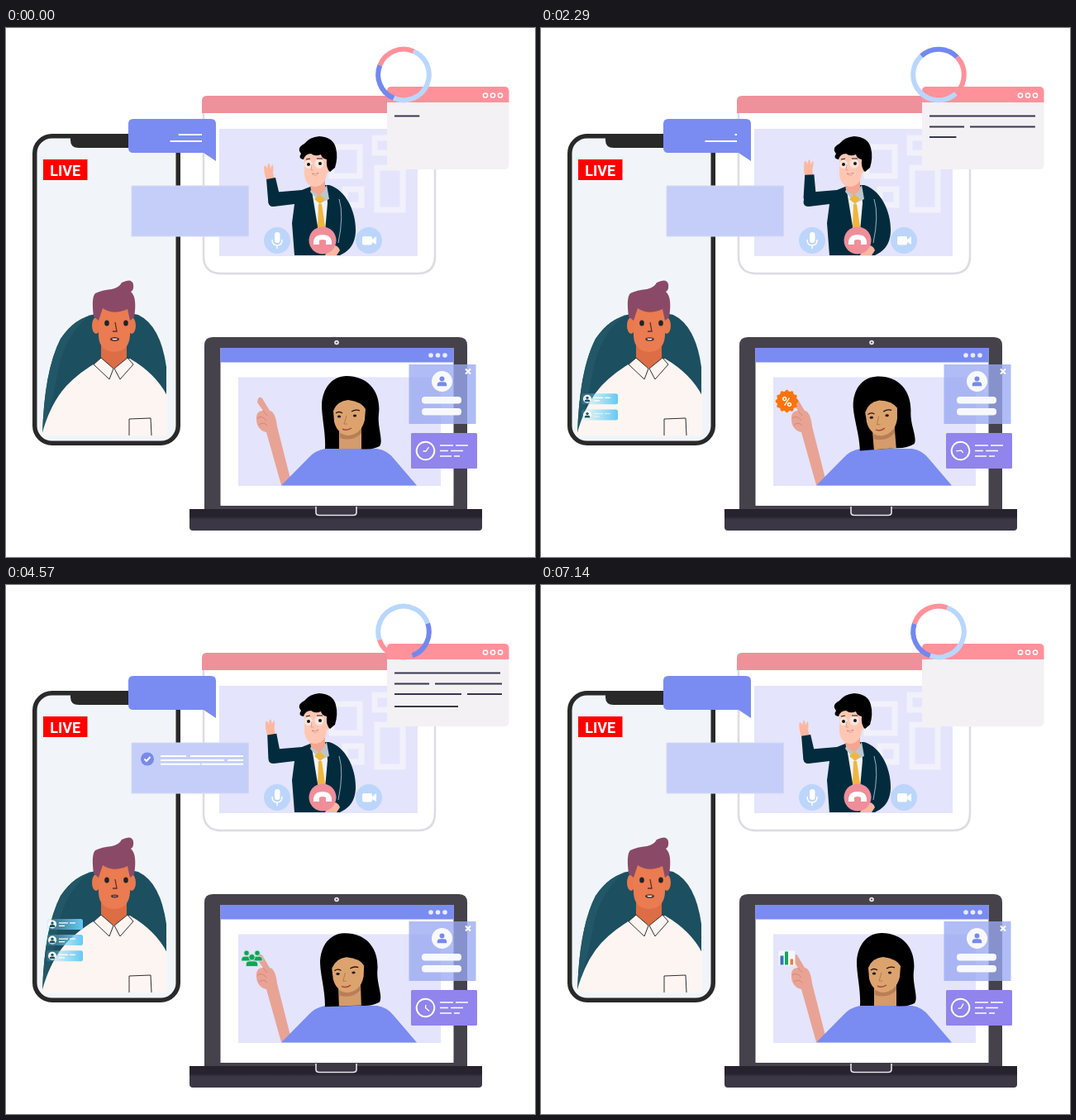
Recreate the animation shown at these times as an HTML page. Size 640x640 px, loop 7210 ms.

```html
<!DOCTYPE html>
<html lang="en">
<head>
<meta charset="utf-8">
<title>Video meetings</title>
<style>
  html, body { margin: 0; width: 100%; height: 100%; overflow: hidden; background: #fff; }
  svg { display: block; width: 100%; height: 100%; }
  text { font-family: Roboto, "Noto Sans", sans-serif; font-weight: 700; text-anchor: middle; }
  .line { fill: none; stroke: #fff; stroke-width: 2; }
</style>
</head>
<body>
<svg viewBox="0 0 640 640">
  <defs>
    <linearGradient id="pillFill">
      <stop offset="0" stop-color="#8fd8f4" stop-opacity=".12"/>
      <stop offset="1" stop-color="#62c9f5"/>
    </linearGradient>
    <linearGradient id="baseFill" x2="0" y2="1">
      <stop offset=".35" stop-color="#27232e"/>
      <stop offset=".5" stop-color="#3b3745"/>
    </linearGradient>
    <clipPath id="phoneView"><path d="M43 300H195V493H43Z"/></clipPath>
    <g id="person">
      <circle cy="-2.2" r="2.6"/><path d="M-5 5.5V4Q-5 1 -2 1H2Q5 1 5 4V5.5Z"/>
    </g>
  </defs>

  <!-- tablet -->
  <path d="M239 95V276Q239 297 261 297H498Q519 297 519 276V95Z" fill="#fff" stroke="#dcdce4" stroke-width="2.5"/>
  <path d="M237 103V88Q237 82 243 82H514Q520 82 520 88V103Z" fill="#ef919b"/>
  <path d="M258 122H498V276H258Z" fill="#e4e4fd"/>
  <path d="M394 144H428V179H394ZM446 133H472V151H446ZM449 169H480V220H449ZM410 195H430V214H410Z" fill="none" stroke="#f1f1fb" stroke-width="7"/>
  <g>
    <path d="M358 196L373 190H391C411 196 424 222 423 247C422 262 415 270 404 275H349L346 236L349 213L324 216Q316 216 318 208L322 199Z" fill="#022c3e"/>
    <g id="forearm">
      <path d="M315 184Q312 176 312 168Q314 164 316 170L317 164Q319 163 320 170L322 165Q324 166 323 175L325 184Z" fill="#fcb7a0"/>
      <path d="M315 183L326 181L331 202Q329 216 322 216Q317 215 317 207Z" fill="#022c3e"/>
    </g>
    <path d="M370 197L374 193H388L389 212L386 246H378Z" fill="#f1f3f6"/>
    <path d="M368 198L371 191L379 202L388 190L391 207L380 212Z" fill="#bcc7cf"/>
    <path d="M379 201L386 207L380 213L373 207ZM378 213H382L386 240L381 250L377 240Z" fill="#efb63d"/>
    <path d="M403 207Q409 226 402 260" fill="none" stroke="#dfe8ee" stroke-opacity=".7"/>
    <path d="M367 184H386V195L379 203L369 196Z" fill="#f4a690"/>
    <path d="M361 148V178Q363 192 375 192Q387 190 388 176Q395 173 394 166L388 147Z" fill="#ffc7b2"/>
    <path d="M360 159Q353 158 357 152Q351 145 361 140Q367 132 379 131Q396 132 399 145Q402 156 398 169L392 174Q387 170 388 159Q382 158 381 153Q374 156 369 152Q362 152 360 159Z" fill="#000"/>
    <g fill="#fff2ea" fill-opacity=".7" stroke="#e5e1df"><circle cx="366" cy="165" r="4.800"/><circle cx="379" cy="164" r="5.500"/></g>
    <g id="eyes" fill="#171318"><circle cx="366" cy="165" r="2"/><circle cx="380" cy="164" r="2"/></g>
    <g id="lids" fill="#f3b8a6"><circle cx="366" cy="165" r="3.500"/><circle cx="379" cy="164" r="4"/></g>
    <path d="M363 159L368 158M376 158L383 158" stroke="#17161a"/>
    <path d="M370 165L369 172H372" fill="none" stroke="#ed9b88"/>
    <path d="M370 176Q374 178 378 175Q375 181 370 176Z" fill="#fff" stroke="#b96861" stroke-width=".6"/>
  </g>
  <path d="M392 262Q402 262 404 269L400 275H386Z" fill="#fcb7a0"/>
  <g fill="#bcd5fb"><circle cx="328" cy="257" r="16"/><circle cx="439" cy="257" r="16"/></g>
  <circle cx="383" cy="257" r="16.500" fill="#ef8e99"/>
  <g fill="#fff">
    <rect x="325" y="247" width="6.500" height="13" rx="3.200"/>
    <path d="M322 256Q322 263 328 263Q334 263 334 256M328 263V267" fill="none" stroke="#fff" stroke-width="1.500"/>
    <path d="M372 262Q371 250 383 250Q395 250 394 262L387 262V257Q383 255 379 257V262Z"/>
    <rect x="431" y="252" width="12" height="10.500" rx="2"/><path d="M443 256L448 252V262L443 259Z"/>
  </g>

  <!-- phone -->
  <rect x="34.750" y="130.750" width="173.500" height="371.500" rx="21" fill="#f1f5f9" stroke="#292929" stroke-width="5.500"/>
  <path d="M78 131H168V137Q168 145 158 145H88Q78 145 78 136Z" fill="#292929"/>
  <path d="M45 159H98.500V184H45Z" fill="#f00"/>
  <text id="live" x="71.800" y="178.700" font-size="18" fill="#fff">LIVE</text>
  <g clip-path="url(#phoneView)">
    <path d="M44 493Q46 415 66 376Q83 350 109 346Q139 342 160 347Q187 360 194 410V493Z" fill="#1c4f60"/>
    <path d="M44 493Q46 415 66 376Q79 357 99 349Q74 371 65 405L57 445Z" fill="#225767"/>
    <path d="M43 493Q53 455 73 433Q89 416 114 402L150 400Q181 418 195 445V493Z" fill="#fdf5f1"/>
    <path d="M115 380H146V401L131 412L115 402Z" fill="#dc6d44"/>
    <ellipse cx="109" cy="360" rx="5" ry="10" fill="#e87a4e"/><ellipse cx="152" cy="360" rx="5" ry="10" fill="#e87a4e"/>
    <path d="M111 335H150V372Q149 391 131 392Q113 391 112 373Z" fill="#eb7b50"/>
    <path d="M106 349Q103 326 108 321Q116 317 128 316Q137 314 140 308Q152 302 154 310Q155 317 151 319Q159 326 155 350L150 354L147 340Q130 348 117 339L112 354Z" fill="#8a4a67"/>
    <path d="M115 399L130 412L125 425L106 407ZM147 399L131 412L138 425L154 407Z" fill="#fdf5f1" stroke="#302f33"/>
    <path d="M149 493V473L175 472L176 493" fill="none" stroke="#302f33"/>
    <g fill="#1f2528"><ellipse cx="122" cy="357" rx="2.800" ry="3.600"/><ellipse cx="145" cy="357" rx="2.800" ry="3.600"/></g>
    <path d="M132 356L134 367H129" fill="none" stroke="#612d29" stroke-width="1.300"/>
    <g id="mouth"><ellipse rx="5.500" ry="2.400" fill="#51302f"/><path id="teeth" d="M-3.500-.8H3.500L2 .8H-2Z" fill="#fff"/></g>
  </g>
  <g id="pills"></g>

  <!-- speech bubble and task card -->
  <path d="M154 110H248Q254 110 254 116V161L239 151H154Q148 151 148 145V116Q148 110 154 110Z" fill="#7a8cf1"/>
  <g id="bubbleRows"></g>
  <path d="M152 191H293.500V252H152Z" fill="#c5cef8" stroke="#d2d9f6"/>
  <g id="task">
    <g id="taskItem">
      <g id="check"><circle cx="171" cy="210.500" r="8" fill="#788aeb"/><path class="line" d="M167.500 210.500L170 213L174.500 208"/></g>
      <g id="taskRows"></g>
    </g>
    <g id="titleRow"></g>
  </g>

  <!-- browser window and ring -->
  <path d="M461 90H608.500V166Q608 171 603 171H461Z" fill="#f3f1f3"/>
  <path d="M461 90V76Q461 71 466 71H603Q608 71 608.500 76V90Z" fill="#ff919a"/>
  <g fill="none" stroke="#fff" stroke-width="1.500"><circle cx="580" cy="81.500" r="2.600"/><circle cx="589" cy="81.500" r="2.600"/><circle cx="598" cy="81.500" r="2.600"/></g>
  <g id="windowRows"></g>
  <g id="ring" fill="none" stroke-width="6"></g>

  <!-- laptop -->
  <path d="M240 583V384Q240 374 250 374H548Q558 374 558 384V583Z" fill="#45424b"/>
  <path d="M259.500 387H541.500V578H259.500Z" fill="#fff"/>
  <path d="M259.500 387H541.500V404.500H259.500Z" fill="#7a8cf1"/>
  <g fill="#e9ecff"><circle cx="514" cy="396" r="2.800"/><circle cx="522.500" cy="396" r="2.800"/><circle cx="531" cy="396" r="2.800"/></g>
  <circle cx="400" cy="380.500" r="2.800" fill="#e8e8ea"/><circle cx="400" cy="380.500" r="1.100" fill="#555"/>
  <path d="M281 422.500H526V554H281Z" fill="#e4e4fd"/>
  <path d="M222 582H576V604Q576 608 572 608H226Q222 608 222 604Z" fill="url(#baseFill)"/>
  <path d="M375 579V586Q375 589.500 379 589.500H420Q424 589.500 424 586V579" fill="#3b3745" stroke="#e4e4e8" stroke-width="1.600"/>
  <path d="M304 453Q305 444 310 448L319 463Q326 464 328 482L344 545L337 553H333L315 489Q302 486 303 470Q304 463 311 463Z" fill="#e8a394"/>
  <path d="M311 463L316 469M304 472Q310 468 315 475M306 480Q312 476 316 481" fill="none" stroke="#d48679"/>
  <path d="M333 553.500L366 520Q374 511 386 509H449Q462 511 470 522L497 553.500Z" fill="#7a8cf1"/>
  <g id="head">
    <path d="M412 421C438 421 454 440 451 467C449 483 457 499 452 506Q442 511 428 509H386C387 490 382 472 382 456C383 435 395 421 412 421Z" fill="#000"/>
    <path d="M403 482H430V509H403Z" fill="#d49b6c"/><path d="M404 490Q417 498 430 484V490Q420 501 404 496Z" fill="#b77e57"/>
    <path d="M396 463Q401 451 414 450Q430 452 435 461L434 474Q430 492 413 493Q400 490 397 476Z" fill="#dda36e"/>
    <path d="M399 466Q403 463 407 466M418 464Q423 461 428 463" fill="none" stroke="#251714" stroke-width="1.300"/>
    <g fill="#211817"><ellipse cx="403" cy="470" rx="2.200" ry="1.500"/><ellipse cx="422" cy="469" rx="2.200" ry="1.500"/></g>
    <path d="M412 469L409 479H413" fill="none" stroke="#b67a51"/>
    <path d="M407 485Q412 488 418 484" fill="none" stroke="#a3483f" stroke-width="1.500"/>
  </g>
  <g id="badge">
    <path id="badgeEdge" fill="#fb7409"/><text y="6" font-size="17" fill="#fff">%</text>
  </g>
  <g id="team" fill="#0da650" stroke="#e4e4fd" stroke-width=".6">
    <use href="#person" transform="translate(-6.500 -3.500) scale(1.250)"/>
    <use href="#person" transform="translate(6.500 -3.500) scale(1.250)"/>
    <use href="#person" transform="translate(0 2) scale(1.450)"/>
  </g>
  <g id="chart">
    <path d="M-10-9H10V9H-10Z" fill="#f4f7fb"/><path d="M-8-3H-4V8H-8Z" fill="#3975b8"/>
    <path d="M-2.500-8H1.500V8H-2.500Z" fill="#18a45b"/><path d="M4 1H7.500V8H4Z" fill="#ef7c37"/>
  </g>

  <!-- floating cards -->
  <path d="M487.500 407H568.500V479H487.500Z" fill="#9aa9f3" fill-opacity=".78"/>
  <g fill="#f8f9ff">
    <circle cx="527.500" cy="427.500" r="12.500"/><rect x="503" y="446" width="48" height="8.500" rx="4"/><rect x="503" y="460" width="48" height="8.500" rx="4"/>
  </g>
  <use href="#person" transform="translate(527.500 427) scale(1.150)" fill="#788aeb"/>
  <path class="line" d="M556 412.500L562 418.500M562 412.500L556 418.500"/>
  <rect x="490" y="490" width="80" height="43" rx="1.500" fill="#9184ec"/>
  <circle class="line" cx="507.500" cy="511.500" r="10.800"/>
  <path id="hands" d="M-3.500 .5H0L3.500-4.500" class="line" style="stroke-width:1.300"/>
  <path class="line" style="stroke-width:1.500" d="M525 505H541M544 505H559M525 511.500H535M538 511.500H553M525 518H539M542 518H549"/>
</svg>
<script>
const LOOP = 7210;
const $ = id => document.getElementById(id);
const clamp = x => Math.max(0, Math.min(1, x));
const ramp = (t, start, length) => clamp((t - start) / length);
const smooth = p => p * p * (3 - 2 * p);
const easeOut = p => 1 - (1 - p) ** 2;
const attr = (node, name, value) => node.setAttribute(name, value);
const place = (node, x, y, scale = 1) => attr(node, 'transform', `translate(${x} ${y}) scale(${scale})`);

function add(parent, tag, attributes) {
  const node = document.createElementNS('http://www.w3.org/2000/svg', tag);
  for (const name in attributes) attr(node, name, attributes[name]);
  return parent.appendChild(node);
}

// A row of words, each [from, to], that is drawn stroke by stroke.
function makeRow(parent, y, words, start, length, color = '#fff') {
  const path = add($(parent), 'path', { class: 'line', style: `stroke:${color}` });
  const total = words.reduce((sum, [a, b]) => sum + Math.abs(b - a), 0);
  return (t, ease = p => p) => {
    let left = total * ease(ramp(t, start, length)), d = '';
    for (const [a, b] of words) {
      const part = Math.min(left, Math.abs(b - a));
      if (part > 0) d += `M${a} ${y}H${a + Math.sign(b - a) * part}`;
      left -= part;
    }
    attr(path, 'd', d);
  };
}

const ink = '#37364f';
const windowRows = [
  makeRow('windowRows', 106.5, [[470, 598]], -125, 1000, ink),
  makeRow('windowRows', 119.5, [[470, 512], [519, 600]], 820, 1700, ink),
  makeRow('windowRows', 132, [[470, 551], [558, 600]], 2050, 1700, ink),
  makeRow('windowRows', 147, [[470, 551]], 3250, 1700, ink)
];
const bubbleRows = [
  makeRow('bubbleRows', 137, [[237, 198.5]], 0, 510),
  makeRow('bubbleRows', 129, [[237, 158]], 500, 980),
  makeRow('bubbleRows', 121.5, [[237, 180.5]], 1340, 1030)
];
const taskRows = [
  makeRow('taskRows', 207, [[187, 218], [223, 287]], 2550, 700),
  makeRow('taskRows', 212, [[187, 264], [268, 287]], 3200, 620),
  makeRow('taskRows', 216.7, [[187, 235], [236.5, 287]], 3850, 650)
];
const titleRow = makeRow('titleRow', 206, [[173, 196], [201, 240]], 5780, 600);

const point = (angle, r) => `${r * Math.cos(angle)} ${r * Math.sin(angle)}`;
const rad = Math.PI / 180;
for (const [from, to, color] of [[293, 473, '#b9d7fd'], [113, 202, '#7288f0'], [202, 293, '#ff919a']])
  add($('ring'), 'path', { d: `M${point(from * rad, 30.8)}A30.8 30.8 0 0 1 ${point(to * rad, 30.8)}`, stroke: color });

attr($('badgeEdge'), 'd', 'M' + Array.from({ length: 96 }, (_, i) => {
  const a = i / 96 * 2 * Math.PI;
  return point(a, 12.9 + Math.cos(12 * a));
}).join('L') + 'Z');

const pops = [40, 1560, 3230, 4900];
const pills = pops.map(() => {
  const pill = add($('pills'), 'g', {});
  add(pill, 'rect', { x: -22, y: -6.5, width: 44, height: 13, rx: 2.5, fill: 'url(#pillFill)' });
  add(pill, 'circle', { cx: -15, r: 5, fill: '#fff' });
  add(pill, 'use', { href: '#person', transform: 'translate(-15 0) scale(.65)', fill: '#1c5364' });
  const words = add(pill, 'path', { class: 'line', style: 'stroke-width:1.2', d: 'M-7-1.5H4M6-1.5H13M-7 2H0' });
  return { pill, words };
});

const bubbleStarts = [-850, 1760, 4630];
const icons = [['badge', 1560, 3300], ['team', 3750, 5500], ['chart', 6200, LOOP]];

function popScale(age) {
  if (age < 200) return 1.2 * Math.sin(ramp(age, 0, 200) * Math.PI / 2);
  return 1.2 - .2 * smooth(ramp(age, 200, 250));
}

function draw(t) {
  const turn = t / LOOP;

  attr($('ring'), 'transform', `translate(481 56.5) rotate(${360 * turn})`);
  attr($('hands'), 'transform', `translate(508 511.500) rotate(${720 * turn})`);
  windowRows.forEach(row => row(t, easeOut));
  attr($('windowRows'), 'opacity', 1 - ramp(t, 5400, 1200));

  const bubbleAge = t - bubbleStarts.filter(s => s <= t).pop();
  bubbleRows.forEach(row => row(bubbleAge));
  attr($('bubbleRows'), 'opacity', bubbleAge < 2500 ? 1 : 0);

  taskRows.forEach(row => row(t));
  titleRow(t);
  attr($('check'), 'opacity', ramp(t, 2350, 200));
  place($('taskItem'), 0, 20 * ramp(t, 4800, 800));
  attr($('task'), 'opacity', 1 - ramp(t, 6750, 300));

  pills.forEach(({ pill, words }, i) => {
    const age = t - pops[i];
    const shift = pops.slice(i + 1).reduce((sum, pop) => sum + smooth(ramp(t, pop - 800, 300)), 0);
    place(pill, 71, 468 - 19.2 * shift, popScale(age));
    attr(pill, 'opacity', ramp(age, 0, 120) * (1 - ramp(t, 5850, 500)));
    attr(words, 'opacity', ramp(age, 400, 500));
  });

  const blink = turn * 3 % 1;
  attr($('live'), 'opacity', clamp(.12 + Math.abs(blink - .5) * 9));

  const wave = smooth(1 - Math.abs(1 - turn * 10 % 2));
  attr($('forearm'), 'transform', `translate(0 ${-5 * wave}) rotate(${9 * wave} 322 212)`);
  const closed = Math.abs(t % (LOOP / 2) - 2930) < 110;
  attr($('eyes'), 'opacity', closed ? 0 : 1);
  attr($('lids'), 'opacity', closed ? 1 : 0);

  const talk = Math.cos(turn * 18 * Math.PI);
  place($('mouth'), 131.5, 376.5, .85 + .15 * talk);
  attr($('teeth'), 'opacity', clamp(.6 + talk));

  const tilt = smooth(ramp(t, 700, 700)) - smooth(ramp(t, 4200, 700));
  attr($('head'), 'transform', `rotate(${-4.500 * tilt} 418 512)`);

  for (const [id, start, end] of icons) {
    const p = ramp(t, start, 500);
    place($(id), 262 + 35.500 * p, 451.5, .55 + .45 * p);
    attr($(id), 'opacity', clamp(p * 1.8) * (1 - ramp(t, end, 220)));
  }
}

function frame() {
  draw(performance.now() % LOOP);
  requestAnimationFrame(frame);
}
frame();
</script>
</body>
</html>
```
